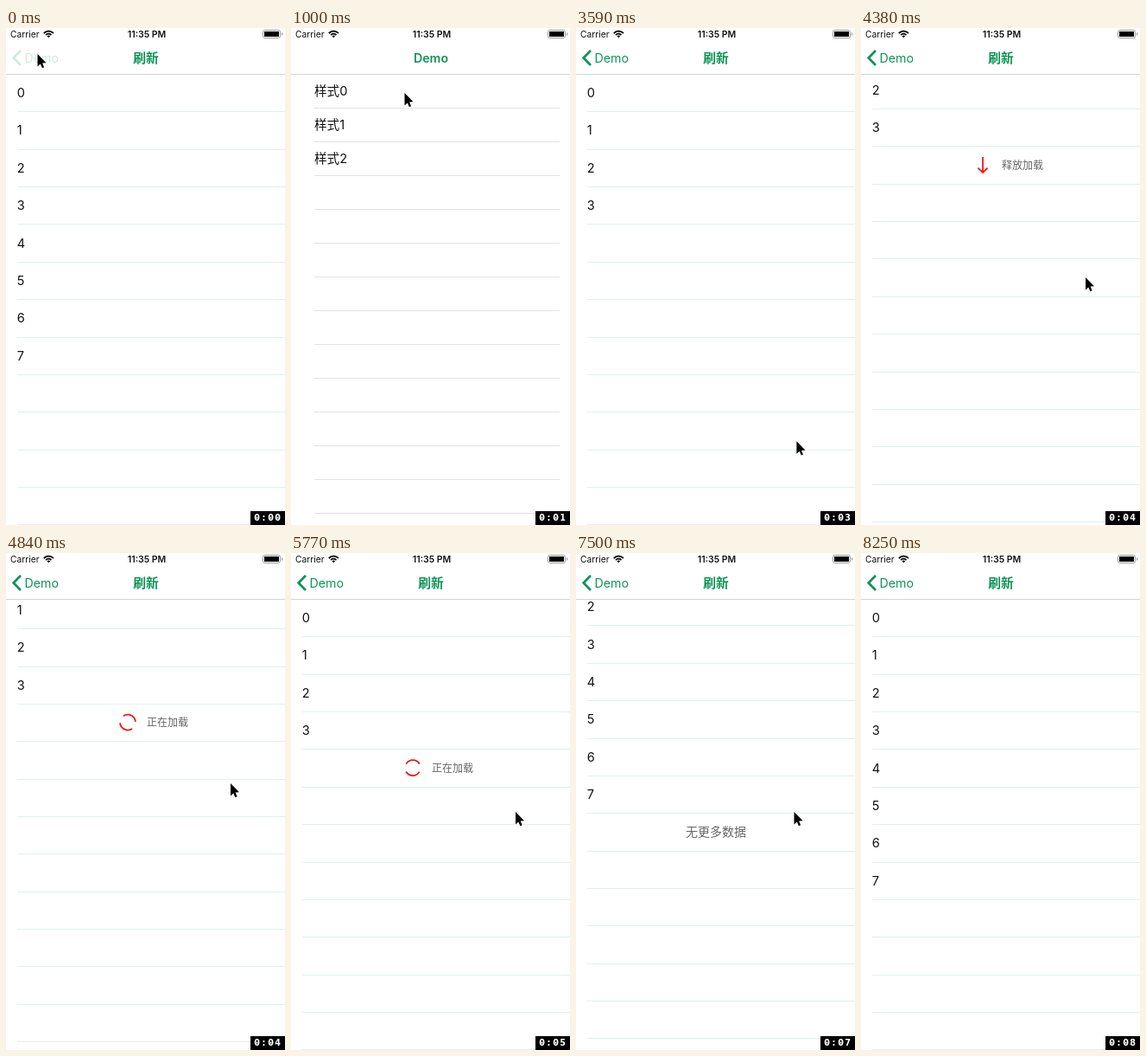
An HTML page with a canvas that plays this animation: 323x574 px, repeating every 8850 ms.

```html
<!DOCTYPE html>
<html lang="zh">
<head>
<meta charset="utf-8">
<style>
html, body { margin: 0; width: 100%; height: 100%; overflow: hidden; background: #fff; }
canvas { display: block; }
</style>
</head>
<body>
<canvas id="stage" width="323" height="574"></canvas>
<script>
const c = document.getElementById('stage').getContext('2d');
const W = 323, H = 574, LOOP = 8850;
const TOP = 53, ROW = 43.36, HEADER = 52;
const GREEN = '#0d9457', RED = '#f01414', GREY = '#666', INK = '#111';
const SANS = 'Inter, "Noto Sans CJK SC", "Noto Sans CJK", sans-serif';

// Moments at which the interface changes state
const POP = 110, TAP = 1170, PUSH = 1230, REFRESHED = 2970;
const DRAG1 = 3880, DROP1 = 4780, LOADED = 6350, DRAG2 = 7040, DROP2 = 7900;

const POINTER = [
  [0, 36.5, 30], [400, 36.5, 30], [900, 131.5, 75], [1300, 131.5, 75], [1800, 136, 80],
  [2450, 136, 80], [3700, 258, 486], [3880, 260, 486], [4380, 260, 288], [4650, 260, 266],
  [4900, 260, 266], [5500, 260, 299], [5900, 260, 299], [6560, 258, 537], [6860, 257.5, 538],
  [7040, 257.5, 538], [7500, 252.5, 299], [7900, 252.5, 301], [8240, 335, 335]
];

const clamp = x => Math.max(0, Math.min(1, x));
const part = (t, start, length) => clamp((t - start) / length);
const smooth = x => x * x * (3 - 2 * x);
const settle = x => x >= 1 ? 1 : 1 - (1 + 9 * x) * Math.exp(-9 * x);

function pointerAt(t) {
  const i = POINTER.findIndex(k => k[0] > t);
  if (i < 0) return POINTER[POINTER.length - 1].slice(1);
  const [t0, x0, y0] = POINTER[i - 1], [t1, x1, y1] = POINTER[i];
  const k = smooth((t - t0) / (t1 - t0));
  return [x0 + (x1 - x0) * k, y0 + (y1 - y0) * k];
}

// Resistance of a list dragged past its end
function rubber(distance) {
  const size = H - TOP, d = Math.max(0, distance);
  return size * (1 - 1 / (d * 0.55 / size + 1));
}

function pulled(t, start, drop, fromY) {
  if (t < start) return 0;
  const pull = rubber(fromY - pointerAt(Math.min(t, drop))[1]);
  return -pull * (1 - settle(part(t, drop, 350)));
}

function offsetAt(t) {
  if (t < TAP) return 0;
  if (t < DRAG1) return HEADER * (1 - settle(part(t, REFRESHED, 400)));
  return t < DRAG2 ? pulled(t, DRAG1, DROP1, 486) : pulled(t, DRAG2, DROP2, 523);
}

// Share of the list page on screen: 0 = menu, 1 = list
function pageAt(t) {
  return t < TAP ? 1 - settle(part(t, POP, 520)) : settle(part(t, PUSH, 520));
}

function text(s, x, y, size, color, { weight = 400, align = 'left', family = SANS } = {}) {
  c.font = `${weight} ${size}px ${family}`;
  c.textAlign = align;
  c.fillStyle = color;
  c.fillText(s, x, y);
}

function rect(x, y, w, h, color) {
  c.fillStyle = color;
  c.fillRect(x, y, w, h);
}

function polyline(points, color, width) {
  c.beginPath();
  points.forEach(p => c.lineTo(...p));
  c.strokeStyle = color;
  c.lineWidth = width;
  c.stroke();
}

function at(x, y, draw, angle = 0, alpha = 1) {
  c.save();
  c.translate(x, y);
  c.rotate(angle);
  c.globalAlpha *= alpha;
  draw();
  c.restore();
}

function spinner(y, t) {
  at(141, y, () => {
    c.strokeStyle = RED;
    c.lineWidth = 1.8;
    for (const mid of [-Math.PI / 2, Math.PI / 2]) {
      c.beginPath();
      c.arc(0, 0, 9, mid - 1.05, mid + 1.05);
      c.stroke();
    }
  }, (t - 5770) / 1000 * Math.PI * 2);
  text('正在加载', 163, y + 4.5, 12, GREY);
}

function arrow(y, angle) {
  at(141, y, () => {
    polyline([[0, -9], [0, 9]], RED, 1.8);
    polyline([[-5.5, 3.5], [0, 9], [5.5, 3.5]], RED, 1.8);
  }, angle);
}

function menuPage(t) {
  rect(0, TOP, W, H, '#fff');
  if (t >= TAP && t < 1970) rect(0, TOP, W, 39, '#d9d9d9');
  for (let i = 0; i < 13; i++) {
    rect(27, 92 + 39 * i, 284, 1, '#e2e2e2');
    if (i < 3) text('样式' + i, 27, 78 + 39 * i, 14.6, INK);
  }
}

function footer(t, y, offset) {
  if (t >= LOADED || t < TAP) {
    if (offset < -0.5) text('无更多数据', 162, y + 5, 14, GREY, { align: 'center' });
  } else if (t >= DROP1) {
    spinner(y, t);
  } else if (offset < -0.5) {
    const turn = clamp((-offset - ROW) / 15);
    arrow(y, Math.PI * (1 - turn));
    text(turn > 0 ? '释放加载' : '上拉加载', 163, y + 4.5, 12, GREY);
  }
}

function listPage(t) {
  const offset = offsetAt(t), top = TOP + offset;
  const count = t < TAP || t >= LOADED ? 8 : 4;
  rect(0, TOP, W, H, '#fff');
  if (offset > 0.5) spinner(top - HEADER / 2 + 0.5, t);
  for (let i = 0; i < 16; i++) {
    rect(13, Math.round(top + ROW * (i + 1)), W, 1, '#e1f0ed');
    if (i < count) text(i, 12.7, top + ROW * (i + 0.5) + 5.4, 14.6, INK);
  }
  footer(t, top + ROW * (count + 0.5), offset);
}

function pages(t, p) {
  c.save();
  c.beginPath();
  c.rect(0, TOP, W, H - TOP);
  c.clip();
  if (p < 0.999) {
    at(Math.round(-0.3 * W * p), 0, () => menuPage(t));
    rect(0, TOP, W, H, `rgba(0,0,0,${0.1 * p})`);
  }
  if (p > 0.001) at(Math.round(W * (1 - p)), 0, () => listPage(t));
  c.restore();
}

function statusBar() {
  text('Carrier', 5, 10.5, 10.3, INK);
  text('11:35 PM', 163, 10.5, 10.5, INK, { weight: 600, align: 'center' });
  c.strokeStyle = '#000';
  c.lineWidth = 1.7;
  for (const r of [4.3, 7.4]) {
    c.beginPath();
    c.arc(49.3, 11, r, -Math.PI * 0.77, -Math.PI * 0.23);
    c.stroke();
  }
  c.fillStyle = '#000';
  c.beginPath();
  c.moveTo(49.3, 11.3);
  c.arc(49.3, 11, 2.4, -Math.PI * 0.77, -Math.PI * 0.23);
  c.fill();
  c.strokeStyle = '#999';
  c.lineWidth = 1;
  c.beginPath();
  c.roundRect(297.5, 2.5, 20, 9, 2.3);
  c.stroke();
  rect(299, 4, 17, 6, '#000');
  rect(319, 5.5, 1.2, 3, '#999');
}

function navBar(t, p) {
  rect(0, 0, W, TOP, '#fff');
  rect(0, TOP, W, 1, '#d2d6d4');
  statusBar();
  const back = p * (t < TAP ? 0.2 : 1), slide = 120 * (1 - p);
  at(0, 0, () => polyline([[17, 26], [8.7, 34.5], [17, 43]], GREEN, 2.7), 0, back);
  at(slide, 0, () => text('Demo', 21.5, 39.5, 14.2, GREEN), 0, back);
  at(-120 * p, 0, () => text('Demo', 162, 39.5, 14.2, GREEN, { weight: 600, align: 'center' }), 0, 1 - p);
  at(slide * 1.2, 0, () => text('刷新', 162, 39.8, 14.7, GREEN, { weight: 700, align: 'center' }), 0, p);
}

function clock(t) {
  rect(283, 558, 40, 16, '#000');
  [...`0:0${Math.floor(t / 1000)}`].forEach((ch, i) => {
    const x = 290.5 + 8 * i;
    text(ch, x, 569, 9.6, '#fff', { weight: 700, align: 'center', family: '"DejaVu Sans", sans-serif' });
    if (ch === '0') rect(x - 0.7, 564.7, 1.4, 1.8, '#fff');
  });
}

function pointer(t) {
  at(...pointerAt(t), () => {
    const shape = [[0, 0], [0, 14.5], [3.3, 11.5], [5.4, 16.3], [7.6, 15.3], [5.6, 10.6], [10, 10.3], [0, 0]];
    polyline(shape, '#fff', 1.8);
    c.fillStyle = '#000';
    c.fill();
  });
}

function frame(now) {
  const t = now % LOOP, p = pageAt(t);
  c.clearRect(0, 0, W, H);
  pages(t, p);
  navBar(t, p);
  pointer(t);
  clock(t);
}

const start = performance.now();
function tick() {
  frame(performance.now() - start);
  requestAnimationFrame(tick);
}
tick();
</script>
</body>
</html>
```
